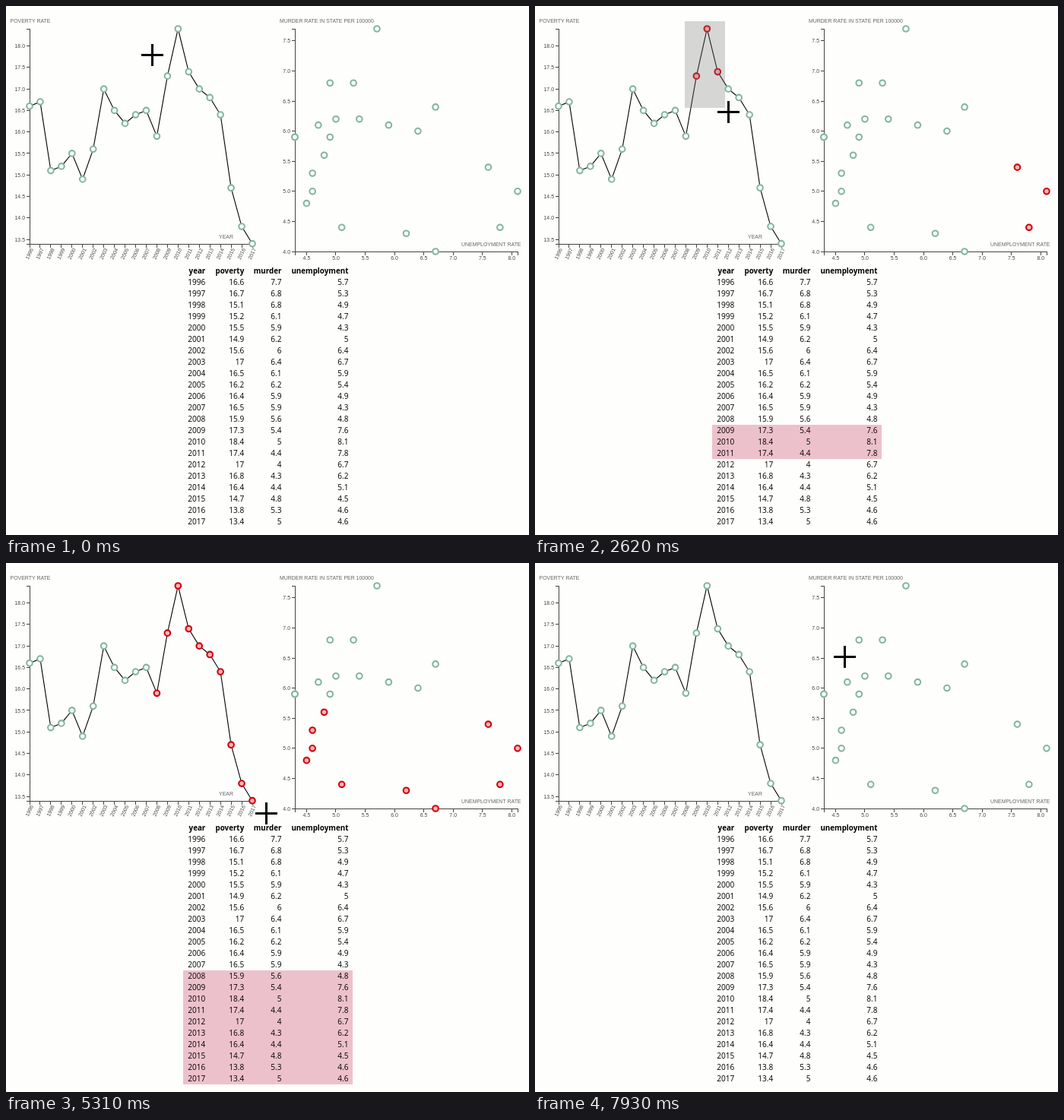
These frames come from a looping animation (688 by 696 pixels, 8 s). An HTML page with a canvas:

```html
<!DOCTYPE html>
<html lang="en">
<head>
<meta charset="utf-8">
<title>Linked brushing</title>
<style>
  html, body { margin: 0; width: 100%; height: 100%; overflow: hidden; background: #fefefd; }
  canvas { display: block; }
</style>
</head>
<body>
<canvas id="stage" width="688" height="696"></canvas>
<script>
const ctx = document.getElementById('stage').getContext('2d');
const LOOP = 8000, SANS = '"Liberation Sans", Arial, sans-serif', HUMAN = '"Open Sans", "Noto Sans", sans-serif';

const poverty = [16.6, 16.7, 15.1, 15.2, 15.5, 14.9, 15.6, 17, 16.5, 16.2, 16.4,
  16.5, 15.9, 17.3, 18.4, 17.4, 17, 16.8, 16.4, 14.7, 13.8, 13.4];
const murder = [7.7, 6.8, 6.8, 6.1, 5.9, 6.2, 6, 6.4, 6.1, 6.2, 5.9,
  5.9, 5.6, 5.4, 5, 4.4, 4, 4.3, 4.4, 4.8, 5.3, 5];
const unemployment = [5.7, 5.3, 4.9, 4.7, 4.3, 5, 6.4, 6.7, 5.9, 5.4, 4.9,
  4.3, 4.8, 7.6, 8.1, 7.8, 6.7, 6.2, 5.1, 4.5, 4.6, 4.6];

const scale = (d0, d1, r0, r1) => v => r0 + (v - d0) / (d1 - d0) * (r1 - r0);
const yearX = scale(1996, 2017, 31, 324), povertyY = scale(13.4, 18.4, 312.7, 30);
const jobsX = scale(4.3, 8.1, 380, 673), murderY = scale(4, 7.7, 323, 30);

const rows = poverty.map((p, i) => ({
  cells: [1996 + i, p, murder[i], unemployment[i]],
  line: [yearX(1996 + i), povertyY(p)],
  dot: [jobsX(unemployment[i]), murderY(murder[i])]
}));

// Motion keys: time, x, y, easing used on the way to that key
const linear = p => p, smooth = p => p * p * (3 - 2 * p);
const easeIn = p => p * p, easeOut = p => p * (2 - p);
const cursorKeys = [
  [30, 192.5, 64.5], [620, 196.5, 21.5, smooth], [1090, 196.5, 21.5],
  [1270, 197.5, 30.5, easeIn], [1790, 216, 69.5], [2620, 254.5, 139.5],
  [3440, 303, 230], [4060, 339.5, 298.5], [4620, 342.5, 329.5, easeOut],
  [5620, 342.5, 329.5], [6060, 325.5, 236.5, smooth], [6950, 325.5, 236.5],
  [7440, 388.5, 206.5, easeIn], [7930, 407.5, 123.5, easeOut]
];
const brushKeys = [
  [1090, 197, 20], [1270, 197, 26], [1790, 211, 64], [2620, 250, 134],
  [3440, 298, 222], [4060, 337, 281], [4270, 340, 296], [4620, 342, 328]
];
const CLICKS = [[970, 196.5, 20], [6620, 325.5, 236.5]];
const BRUSH_START = 1090, BRUSH_END = 5310, CLEAR = 6690;

function at(keys, t) {
  const i = keys.findIndex(k => k[0] > t);
  if (i === 0) return keys[0].slice(1, 3);
  if (i < 0) return keys[keys.length - 1].slice(1, 3);
  const [t0, x0, y0] = keys[i - 1], [t1, x1, y1, ease = linear] = keys[i];
  const p = ease((t - t0) / (t1 - t0));
  return [x0 + (x1 - x0) * p, y0 + (y1 - y0) * p];
}

function rect(x, y, w, h, color) {
  ctx.fillStyle = color;
  ctx.fillRect(x, y, w, h);
}

function text(s, x, y, font, align = 'left', color = '#000') {
  ctx.font = font;
  ctx.textAlign = align;
  ctx.fillStyle = color;
  ctx.fillText(s, x, y);
}

const small = (s, x, y, align, color = '#444') => text(s, x, y, '6.95px ' + SANS, align, color);
const title = (s, x, y, align) => small(s, x, y, align, '#666');
const hLine = (x, y, w) => rect(x, Math.floor(y), w, 1, '#444');
const vLine = (x, y, h) => rect(Math.floor(x), y, 1, h, '#444');

function yAxis(x, top, bottom, first, last, y) {
  vLine(x, top, bottom - top);
  hLine(x - 4, top, 4);
  hLine(x - 4, bottom, 4);
  for (let v = first; v <= last; v += 0.5) {
    hLine(x - 4, y(v), 4);
    small(v.toFixed(1), x - 6, y(v) + 2.6, 'right');
  }
}

function xAxis(y, left, right) {
  hLine(left, y, right - left + 1);
  vLine(left, y, 5);
  vLine(right, y, 5);
}

function drawAxes() {
  title('POVERTY RATE', 5.5, 22);
  title('YEAR', 299, 306, 'right');
  yAxis(31, 30, 313, 13.5, 18, povertyY);
  xAxis(313, 31, 324);
  for (const { cells: [year], line: [x] } of rows) {
    vLine(x, 313, 5);
    ctx.save();
    ctx.translate(x - 0.5, 326);
    ctx.rotate(-65 * Math.PI / 180);
    small(year, 0, 2.5, 'center');
    ctx.restore();
  }

  title('MURDER RATE IN STATE PER 100000', 360, 22);
  title('UNEMPLOYMENT RATE', 677.5, 316, 'right');
  yAxis(380, 30, 323, 4, 7.5, murderY);
  xAxis(323, 380, 673);
  for (let v = 4.5; v <= 8; v += 0.5) {
    vLine(jobsX(v), 323, 5);
    small(v.toFixed(1), jobsX(v), 333.7, 'center');
  }
}

function circle([x, y], on) {
  ctx.beginPath();
  ctx.arc(x, y, 3.8, 0, 2 * Math.PI);
  ctx.fillStyle = on ? '#fbb4bd' : '#fff';
  ctx.strokeStyle = on ? '#d00008' : '#85b5a3';
  ctx.lineWidth = 2.1;
  ctx.fill();
  ctx.stroke();
}

function drawTable(selected) {
  const right = [262.3, 313.2, 362.5, 450.4];
  ['year', 'poverty', 'murder', 'unemployment'].forEach((s, c) =>
    text(s, right[c], 352, 'bold 9.8px ' + HUMAN, 'right'));
  rows.forEach(({ cells }, i) => {
    const y = 356 + 15 * i;
    if (selected(rows[i])) rect(233, y, 223, 15, '#edc1cc');
    cells.forEach((v, c) => text(v, right[c], y + 11, '10.1px ' + HUMAN, 'right'));
  });
}

function drawClick(t, [start, x, y]) {
  const p = (t - start) / 420;
  if (p < 0 || p >= 1) return;
  const r = 5 + 43 * p, inner = Math.max(0, r - 11);
  const glow = ctx.createRadialGradient(x, y, inner, x, y, r);
  const alpha = 0.6 * Math.min(1, 3 * (1 - p));
  [0, alpha, alpha, 0].forEach((a, i) => glow.addColorStop([0, 0.4, 0.65, 1][i], `rgba(255,50,50,${a})`));
  ctx.beginPath();
  ctx.arc(x, y, r, 0, 2 * Math.PI);
  ctx.arc(x, y, inner, 0, 2 * Math.PI, true);
  ctx.fillStyle = glow;
  ctx.fill();
}

function drawCursor([cx, cy]) {
  const x = Math.round(cx - 14.5), y = Math.round(cy - 14.5);
  rect(x, y + 13, 29, 3, '#000');
  rect(x + 13, y, 3, 29, '#000');
}

function draw(t) {
  const [bx, by] = at(brushKeys, t);
  const selected = ({ line: [x, y] }) =>
    t >= BRUSH_START && t < CLEAR && x >= 197 && x <= bx && y >= 20 && y <= by;

  rect(0, 0, 688, 696, '#fefefd');
  drawAxes();

  ctx.beginPath();
  rows.forEach(r => ctx.lineTo(...r.line));
  ctx.strokeStyle = '#000';
  ctx.lineWidth = 1.1;
  ctx.stroke();

  for (const r of rows) {
    circle(r.line, selected(r));
    circle(r.dot, selected(r));
  }
  if (t >= BRUSH_START && t < BRUSH_END)
    rect(197, 20, Math.round(bx) - 197, Math.round(by) - 20, 'rgba(119,119,119,.3)');

  drawTable(selected);
  CLICKS.forEach(c => drawClick(t, c));
  drawCursor(at(cursorKeys, t));
}

const begin = performance.now();
function tick() {
  draw((performance.now() - begin) % LOOP);
  requestAnimationFrame(tick);
}
tick();
</script>
</body>
</html>
```
